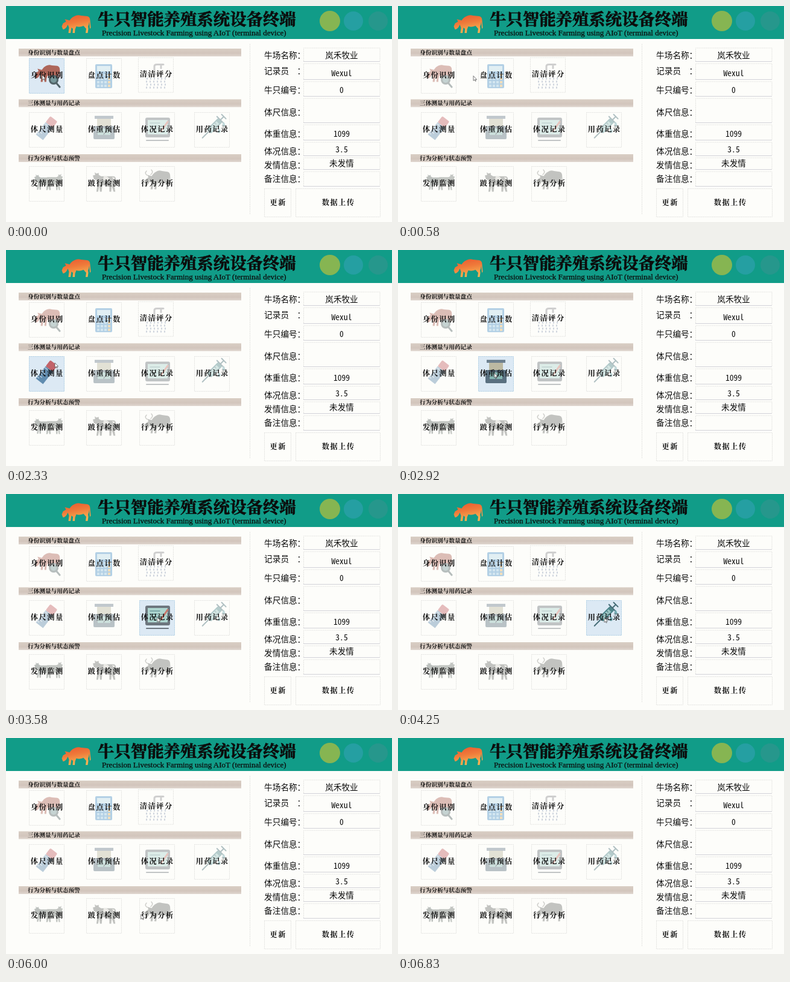
Animation, 640 px wide and 360 px high, one loop 7.16 s. Source, as an HTML page:

```html
<!DOCTYPE html>
<html lang="zh-CN">
<head>
<meta charset="utf-8">
<style>
html, body { margin: 0; width: 100%; height: 100%; overflow: hidden; background: #fdfdfa; }
svg { display: block; width: 640px; height: 360px; }
text { font-family: "Noto Sans CJK SC", "Noto Sans CJK", "Noto Sans", sans-serif; fill: #0c0c0c; }
.serif { font-family: "Noto Serif CJK SC", "Noto Sans CJK SC", "Noto Serif", serif; font-weight: 900; }
.title { stroke: #0c0c0c; stroke-width: .7; }
.latin { font-family: "Liberation Serif", serif; stroke: #0c0c0c; stroke-width: .25; }
.label { font-family: LiSu, "Noto Serif CJK SC", "Noto Sans CJK SC", serif; font-weight: 900; letter-spacing: 1.6px; }
.value { font-family: "Noto Sans Mono CJK SC", "Noto Sans CJK SC", "Noto Sans Mono", monospace; }
.frame { fill: none; stroke: #e3e3e0; stroke-dasharray: 2 1; }
.tile .icon { opacity: .38; }
.tile.on .frame { fill: #dce9f4; stroke: #a9cbe2; }
.tile.on .icon { opacity: .9; }
</style>
</head>
<body>
<svg id="stage" viewBox="0 0 640 360">
  <defs>
    <linearGradient id="tan" x2="0" y2="1">
      <stop stop-color="#d9cec4"/><stop offset=".6" stop-color="#d2c5bc"/><stop offset="1" stop-color="#dfd6cf"/>
    </linearGradient>
    <linearGradient id="orange" x2=".3" y2="1">
      <stop stop-color="#e9572f"/><stop offset=".5" stop-color="#ef7a3a"/><stop offset="1" stop-color="#f6b052"/>
    </linearGradient>
    <path id="bull" d="M1 20L3 15L8 12L6 8L10 9L14 10Q17 5 22 3Q27 0 33 2L43 3Q48 4 48 10L49 22L47.6 24L46.6 12Q46 17 44.5 20L45 24L44 31H40.5L41.5 24L37 19Q31 22 25 20L23 25L22.5 31H19L19.5 24L17 22L15.5 31H12L13 22L11 17L9 21Q6 25 3 25Z"/>
    <path id="cow" d="M0 7L4 6L3 2L6 4L10 3L10 6L14 8H34Q39 8 39 13L40 23L38 21L37 16L36 21L38 32H35L32 23L31 32H28L28 22Q21 24 16 21L15 32H12L11 22L9 32H6L8 20L6 14L2 13Z"/>
  </defs>
</svg>
<script>
const stage = document.getElementById("stage");
const add = html => stage.insertAdjacentHTML("beforeend", html);

// y is the middle of the glyphs
const text = (str, x, y, size, cls = "", anchor = "start") =>
  `<text x="${x}" y="${y + size * .37}" font-size="${size}" class="${cls}" text-anchor="${anchor}">${str}</text>`;
const rect = (x, y, w, h, fill, extra = "") =>
  `<rect x="${x}" y="${y}" width="${w}" height="${h}" fill="${fill}" ${extra}/>`;
const path = (d, fill, extra = "") => `<path d="${d}" fill="${fill}" ${extra}/>`;
const line = (d, color, width = 2) => path(d, "none", `stroke="${color}" stroke-width="${width}" stroke-linecap="round"`);
const disc = (x, y, r, fill) => `<circle cx="${x}" cy="${y}" r="${r}" fill="${fill}"/>`;
const grid = (cols, rows, cell) => Array.from({ length: cols * rows },
  (_, i) => cell(i % cols, Math.floor(i / cols))).join("");

// Icons live in a 58 x 58 box
const icons = {
  identity: `<use href="#bull" transform="translate(9 10) scale(.88 .95)" fill="#a8584a"/>` +
    line("M46 42L51 48", "#44565a", 3) + disc(41, 36, 8, "#44565a") + disc(41, 36, 5, "#6d9092"),
  count: rect(15, 10, 28, 40, "#3d89c4", 'rx="2"') + rect(18, 13, 22, 9, "#b4dbea") +
    grid(4, 4, (c, r) => rect(18 + c * 6, 26 + r * 6, 4, 4, c == 3 ? "#dcae5c" : "#8fbfe0")),
  clean: line("M27 26V15Q27 12 31 12H42M38 12V18", "#85858c", 3) + rect(15, 26, 27, 4, "#85858c", 'rx="2"') +
    grid(6, 4, (c, r) => rect(14 + c * 6 - r % 2, 34 + r * 5, 2, 3, "#8494b0")),
  ruler: `<g transform="rotate(38 30 25)">` + rect(23, 7, 15, 13, "#c0545a", 'rx="2"') +
    rect(23, 20, 15, 26, "#5382a8") +
    grid(1, 6, (c, r) => rect(23, 22 + r * 4, r % 2 ? 4 : 7, 1, "#dbe6ee")) + `</g>`,
  weight: rect(14, 6, 31, 5, "#627585") + rect(18, 11, 23, 13, "#b9b49a") +
    rect(12, 23, 35, 22, "#4d6474", 'rx="2"') + rect(19, 27, 21, 11, "#7db2ac") + line("M29 37L34 30", "#2b3d48", 1.5),
  condition: rect(10, 9, 41, 33, "#626a72", 'rx="3"') + rect(14, 13, 33, 24, "#a9d3cc") +
    line("M18 18H34M18 23H30M18 28H33", "#5f8f90", 1.5) + line("M47 16L36 32", "#c86a5c", 3) + line("M12 47H48", "#626a72"),
  medicine: `<g transform="rotate(45 30 25)">` + rect(26, 7, 10, 27, "#3f7c80", 'rx="2"') +
    rect(28, 13, 6, 18, "#93c2bf") + line("M31 34V49M31 7V-1M26 -1H36M23 7H39", "#36606a", 2) +
    line("M28 17H31M28 22H31M28 27H31", "#36606a", 1) + `</g>` +
    path("M41 26Q47 34 41 35Q36 33 41 26M49 16Q54 23 49 24Q44 22 49 16", "#6ba5ad"),
  heat: `<use href="#cow" transform="translate(9 12) scale(.72 .85)" fill="#55605c"/>
    <use href="#cow" transform="translate(56 11) scale(-.72 .9)" fill="#666f6a"/>`,
  gait: `<use href="#cow" transform="translate(11 8) scale(.98 1.08)" fill="#646864"/>` +
    path("M29 17Q36 16 38 21Q34 25 28 22ZM43 18L47 19L46 25Z", "#cfcdc6"),
  behave: `<use href="#bull" transform="translate(8 6) scale(.9 1.05)" fill="#636764"/>` +
    line("M13 15Q8 12 12 8M19 14Q24 10 20 6", "#80817b", 1.5)
};

const SIZE = 58;
const tiles = [
  ["身份识别", 38, 87, "identity"], ["盘点计数", 133, 87, "count"], ["清洁评分", 219, 85.5, "clean"],
  ["体尺测量", 38, 177, "ruler"], ["体重预估", 133, 177, "weight"],
  ["体况记录", 221, 177, "condition"], ["用药记录", 312, 177, "medicine"],
  ["发情监测", 38, 267, "heat"], ["跛行检测", 133, 267, "gait"], ["行为分析", 221, 267, "behave"]
];
const fields = [
  ["牛场名称", 82, "岚禾牧业", 82, 92], ["记录员", 108, "Wexul", 112, 122],
  ["牛只编号", 140, "0", 140, 150], ["体尺信息", 177, "", 177, 194],
  ["体重信息", 213, "1099", 213, 223], ["体况信息", 242, "3.5", 239, 249],
  ["发情信息", 265, "未发情", 262, 272], ["备注信息", 288, "", 288, 300]
];

// Header
add(rect(0, 0, 640, 55, "#119c88") +
  `<use href="#bull" x="91.5" y="14" fill="url(#orange)"/>` +
  text("牛只智能养殖系统设备终端", 152, 22, 27.4, "serif title") +
  text("Precision Livestock Farming using AIoT (terminal device)", 159, 44.5, 13.06, "latin") +
  disc(537, 25, 17, "#86b552") + disc(576, 25, 16, "#259fa2") + disc(617, 25, 16, "#26978c"));

// Left side
[["身份识别与数量盘点", 71], ["三体测量与用药记录", 155.5], ["行为分析与状态预警", 247]].forEach(([title, y]) =>
  add(rect(21, y, 369, 13, "url(#tan)") + text(title, 36, y + 6, 9.67, "serif")));
tiles.forEach(([name, x, y, icon]) => add(`<g class="tile" transform="translate(${x} ${y})">
  <rect class="frame" x=".5" y=".5" width="${SIZE}" height="${SIZE}"/><g class="icon">${icons[icon]}</g>
  ${text(name, 30.3, 28, 12.2, "label", "middle")}</g>`));

// Right side
add(`<path class="frame" d="M404.5 63V348"/>`);
fields.forEach(([name, y, value, valueY, base], i) => {
  const top = i ? fields[i - 1][4] + 4 : 70;
  add(text(name, 428, y, 13.7) + text("：", 482.5, y, 13.7) +
    `<path class="frame" d="M493.5 ${base}V${top}H620V${base}"/>` + rect(493, base, 127, 1, "#d2d2d8") +
    text(value, 556.5, valueY, 13.6, "value", "middle"));
});
[["更新", 428.5, 44], ["数据上传", 480.5, 140]].forEach(([name, x, w]) =>
  add(`<rect class="frame" x="${x}" y="304.5" width="${w}" height="47"/>` +
    text(name, x + w / 2 + .8, 327, 12.2, "label", "middle")));

add(`<path id="cursor" d="M0 0V8L2 6.3L3.3 9L4.4 8.4L3.2 6H5.6Z" fill="#fff" stroke="#444" stroke-width=".7"/>`);

const LOOP = 7160, TICK = 1000 / 12, LAG = 2 * TICK;
// The pointer sweeps each row at a steady pace and returns through the gaps: [time, x, y]
const track = [
  [0, 60, 115], [1167, 190, 118], [1333, 220, 120], [1670, 268, 122],
  [1830, 255, 152], [2000, 80, 155], [2080, 58, 195],
  [2333, 81, 188], [2920, 160, 205], [4250, 342, 206], [4420, 345, 212],
  [4500, 330, 248], [4750, 80, 252], [4830, 62, 292],
  [5083, 86, 292], [5250, 109, 288], [6250, 262, 296], [6670, 290, 364], [LOOP, 290, 380]
];

function pointer(t) {
  const next = Math.max(1, track.findIndex(p => p[0] > t));
  const [t0, x0, y0] = track[next - 1], [t1, x1, y1] = track[next];
  const k = (t - t0) / (t1 - t0);
  return [x0 + (x1 - x0) * k, y0 + (y1 - y0) * k];
}

const tileNodes = [...document.querySelectorAll(".tile")];
const cursor = document.getElementById("cursor");

function draw(now) {
  // The screen updates twelve times a second; highlights trail the pointer
  const t = Math.floor((now % LOOP + 4) / TICK) * TICK;
  const [hx, hy] = pointer(Math.max(0, t - LAG));
  tiles.forEach(([, x, y], i) => tileNodes[i].classList.toggle("on",
    hx >= x && hx <= x + SIZE && hy >= y && hy <= y + SIZE));
  cursor.setAttribute("transform", `translate(${pointer(t)})`);
}

const start = performance.now();
function loop() {
  draw(performance.now() - start);
  requestAnimationFrame(loop);
}
loop();
</script>
</body>
</html>
```
